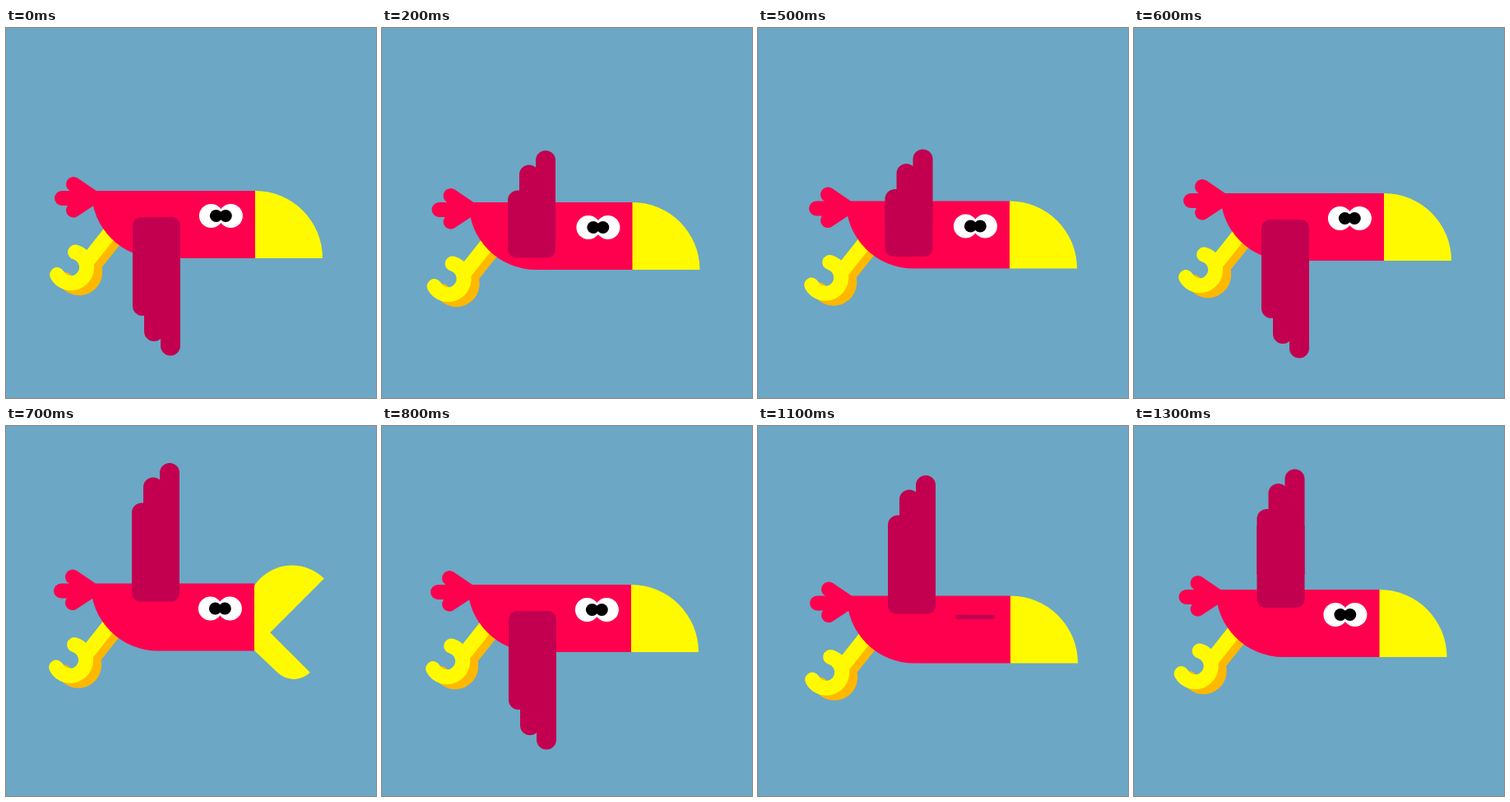
An HTML page with a canvas that plays this animation: 450 px wide and 450 px high, repeating every 1.4 s.

```html
<!DOCTYPE html>
<html>
<head>
<meta charset="utf-8">
<style>
html, body { margin: 0; width: 100%; height: 100%; overflow: hidden; background: #6ca7c5; }
canvas { display: block; }
</style>
</head>
<body>
<canvas id="stage" width="450" height="450"></canvas>
<script>
const c = document.getElementById('stage').getContext('2d');
const RED = '#ff004f', DARK = '#c2004f', YELLOW = '#fffa00', ORANGE = '#ffb800';
const STEP = 100;

// Wing states: root x, root y, direction, shortening
const WINGS = {
  up: [-149, 22, -1, 0],
  upShort: [-151.5, 67.5, -1, 38],
  downShort: [-151, -27.5, 1, 38],
  down: [-149, 32, 1, 0]
};

// Beak joint x, body top y, wing state
const POSES = [
  [303, 198, 'down'], [303, 194, 'up'], [304.5, 212, 'upShort'], [306, 212, 'downShort'],
  [307, 212, 'up'], [306, 210.5, 'upShort'], [304, 201, 'down'], [302, 191.5, 'up'],
  [303, 193, 'down'], [306, 196.5, 'downShort'], [307, 207.5, 'down'], [307, 206.5, 'up'],
  [303, 197, 'down'], [298.5, 199, 'up']
];
const BEAK_OPEN = 7, BLINK = 11;

function fill(color, draw) {
  c.fillStyle = color;
  c.beginPath();
  draw();
  c.fill();
}

function disc(color, x, y, r) {
  fill(color, () => c.arc(x, y, r, 0, 7));
}

function line(color, width, ...pts) {
  c.strokeStyle = color;
  c.lineWidth = width;
  c.lineCap = 'round';
  c.beginPath();
  for (let i = 0; i < pts.length; i += 2) c.lineTo(pts[i], pts[i + 1]);
  c.stroke();
}

function foot(color, x, y) {
  c.strokeStyle = color;
  c.lineWidth = 18;
  c.lineCap = 'round';
  c.beginPath();
  c.arc(x, y, 19.2, -1.3, 2.65);
  c.stroke();
}

function leg() {
  line(ORANGE, 18, -193, 87, -165, 52);
  foot(ORANGE, -214, 99);
  line(YELLOW, 18, -202, 83, -175, 49);
  foot(YELLOW, -224, 93);
}

function body() {
  line(RED, 18, -221, -8, -199, 7);
  line(RED, 18, -235, 9, -199, 9);
  line(RED, 18, -221, 23.5, -199, 9);
  fill(RED, () => {
    c.moveTo(0.5, 0);
    c.lineTo(-199, 0);
    c.arc(-117, 0, 82, Math.PI, Math.PI / 2, true);
    c.lineTo(0.5, 82);
  });
}

function beak(open) {
  if (!open) {
    fill(YELLOW, () => {
      c.moveTo(0, 82);
      c.arc(0, 82, 82, -Math.PI / 2, 0);
    });
    return;
  }
  const q = Math.PI / 4;
  c.save();
  c.beginPath();
  c.rect(0, -60, 120, 220);
  c.clip();
  fill(YELLOW, () => {
    c.arc(46, 33, 55, 3 * q, -q);
    c.lineTo(0, 79);
  });
  fill(YELLOW, () => {
    c.arc(48, 88.5, 28, q, 3 * q);
    c.lineTo(0, 81.5);
    c.lineTo(0, 40.5);
  });
  c.restore();
}

function eyes(shut) {
  if (shut) {
    line(DARK, 5.5, -64.2, 25.7, -21.8, 25.7);
    return;
  }
  for (const x of [-53.5, -29.7]) disc('#fff', x, 30.5, 14.6);
  for (const x of [-47.5, -35.8]) disc('#000', x, 30.5, 7.6);
}

function wing([x, y, dir, cut]) {
  c.save();
  c.translate(x, y);
  c.scale(1, dir);
  fill(DARK, () => c.roundRect(0, 0, 58, 100 - cut, [10, 10, 0, 0]));
  [[0, 120], [14, 151], [34, 168.5]].forEach(([left, end]) =>
    fill(DARK, () => c.roundRect(left, 40, 24, end - cut - 40, [0, 0, 12, 12])));
  c.restore();
}

function draw(now) {
  const i = Math.floor(now / STEP) % POSES.length;
  const [x, y, state] = POSES[i];
  c.fillStyle = '#6ca7c5';
  c.fillRect(0, 0, 450, 450);
  c.save();
  c.translate(x, y);
  leg();
  body();
  beak(i === BEAK_OPEN);
  eyes(i === BLINK);
  wing(WINGS[state]);
  c.restore();
}

const start = performance.now();
function tick() {
  draw(performance.now() - start);
  requestAnimationFrame(tick);
}
tick();
</script>
</body>
</html>
```
